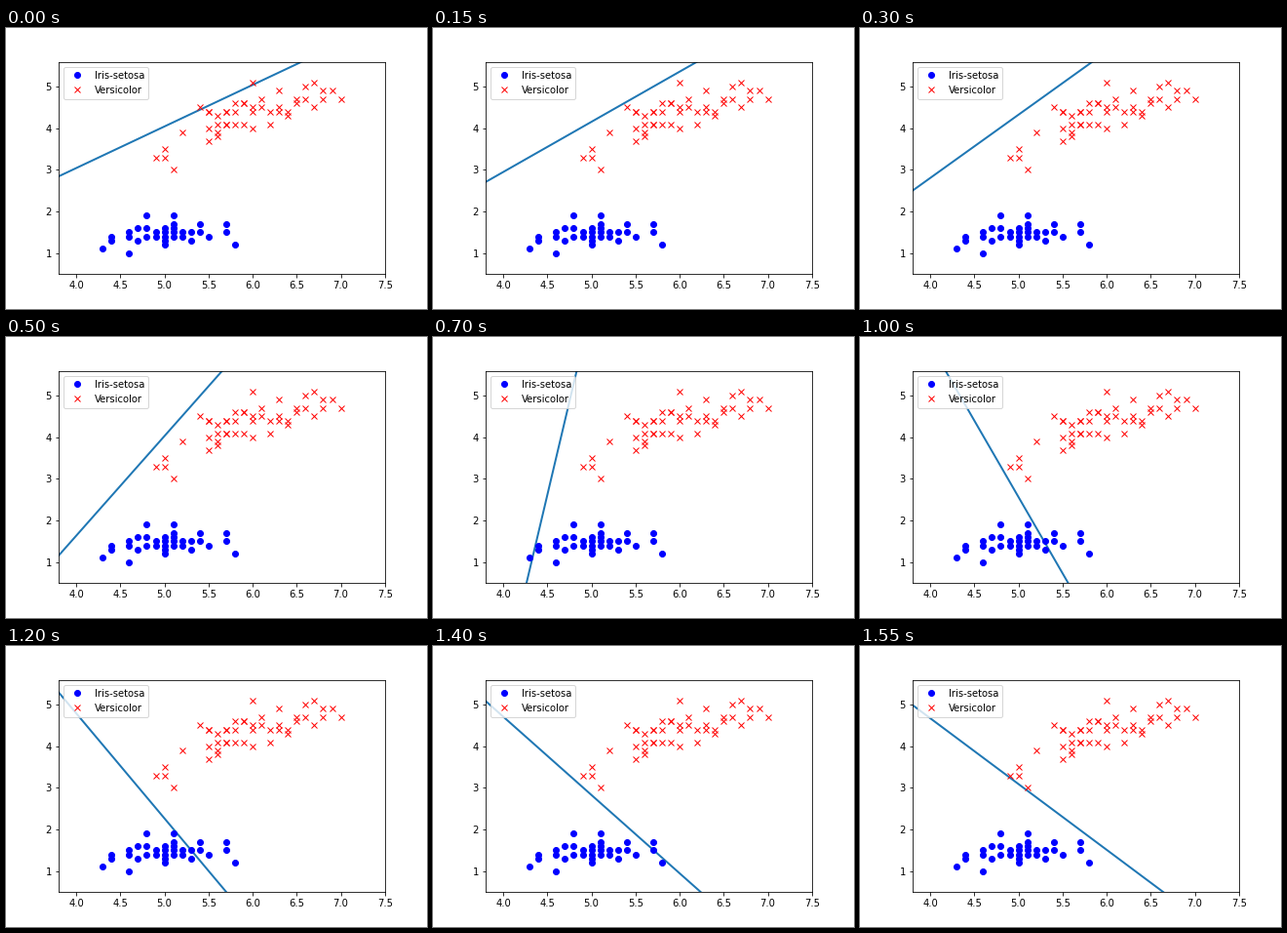
A matplotlib script that plays this animation: 432x288 px, repeating every 5 s.

```python
import matplotlib.pyplot as plt
import numpy as np
from matplotlib.animation import FuncAnimation

INTERVAL = 50
FRAMES = 100
X_LIM = (3.8, 7.5)
Y_LIM = (0.5, 5.6)

# Boundary while it learns: step, x at the bottom edge, x at the top edge
BOUNDARY_KEYS = np.array([
    (0, 1.455, 6.557), (6, 2.482, 5.839), (10, 3.526, 5.656),
    (14, 4.264, 4.833), (20, 5.563, 4.173), (24, 5.700, 3.680),
    (31, 6.640, 3.414),
])


def setosa_points():
    """Evenly spaced rows of measurements, in tenths of a centimetre."""
    rows = {
        10: [46], 11: [43], 12: range(50, 59, 8), 13: range(44, 56, 3),
        14: [44, 46, *range(48, 53), 55], 15: [46, *range(49, 55), 57],
        16: [47, 48, 50, 51], 17: range(51, 58, 3), 19: range(48, 52, 3),
    }
    return np.array([(x, y) for y, xs in rows.items() for x in xs]) / 10


def versicolor_points(rng, count=38):
    """A rising cloud, denser on the left, with a few stragglers."""
    x = 5.5 + 1.3 * np.linspace(0, 1, count) ** 1.4
    y = 4 + 0.6 * (x - 5.5) + rng.uniform(-0.4, 0.4, count)
    cloud = np.column_stack([x, y]).round(1)
    stragglers = [(4.9, 3.3), (5.0, 3.3), (5.0, 3.5), (5.1, 3.0), (5.2, 3.9),
                  (5.4, 4.5), (6.0, 5.1), (6.9, 4.9), (7.0, 4.7)]
    return np.vstack([cloud, stragglers])


plt.rcParams["font.family"] = "DejaVu Sans"
fig = plt.figure(figsize=(6, 4), dpi=72, facecolor="white")
ax = fig.add_axes([0.125, 0.125, 0.775, 0.755])
boundary, = ax.plot([], [], color="#1f77b4", lw=2)
ax.plot(*setosa_points().T, "bo", label="Iris-setosa")
ax.plot(*versicolor_points(np.random.default_rng(4)).T, "rx",
        label="Versicolor")
ax.set(xlim=X_LIM, ylim=Y_LIM)
ax.legend(loc="upper left")


def update(frame):
    steps, bottoms, tops = BOUNDARY_KEYS.T
    bottom = np.interp(frame, steps, bottoms)
    top = np.interp(frame, steps, tops)
    # Overshoot both ends so the axes clip the line
    t = np.array([-0.1, 1.1])
    boundary.set_data(bottom + (top - bottom) * t,
                      Y_LIM[0] + (Y_LIM[1] - Y_LIM[0]) * t)
    return boundary,


anim = FuncAnimation(fig, update, frames=FRAMES, interval=INTERVAL,
                     repeat=True, repeat_delay=0)
plt.show()
```
